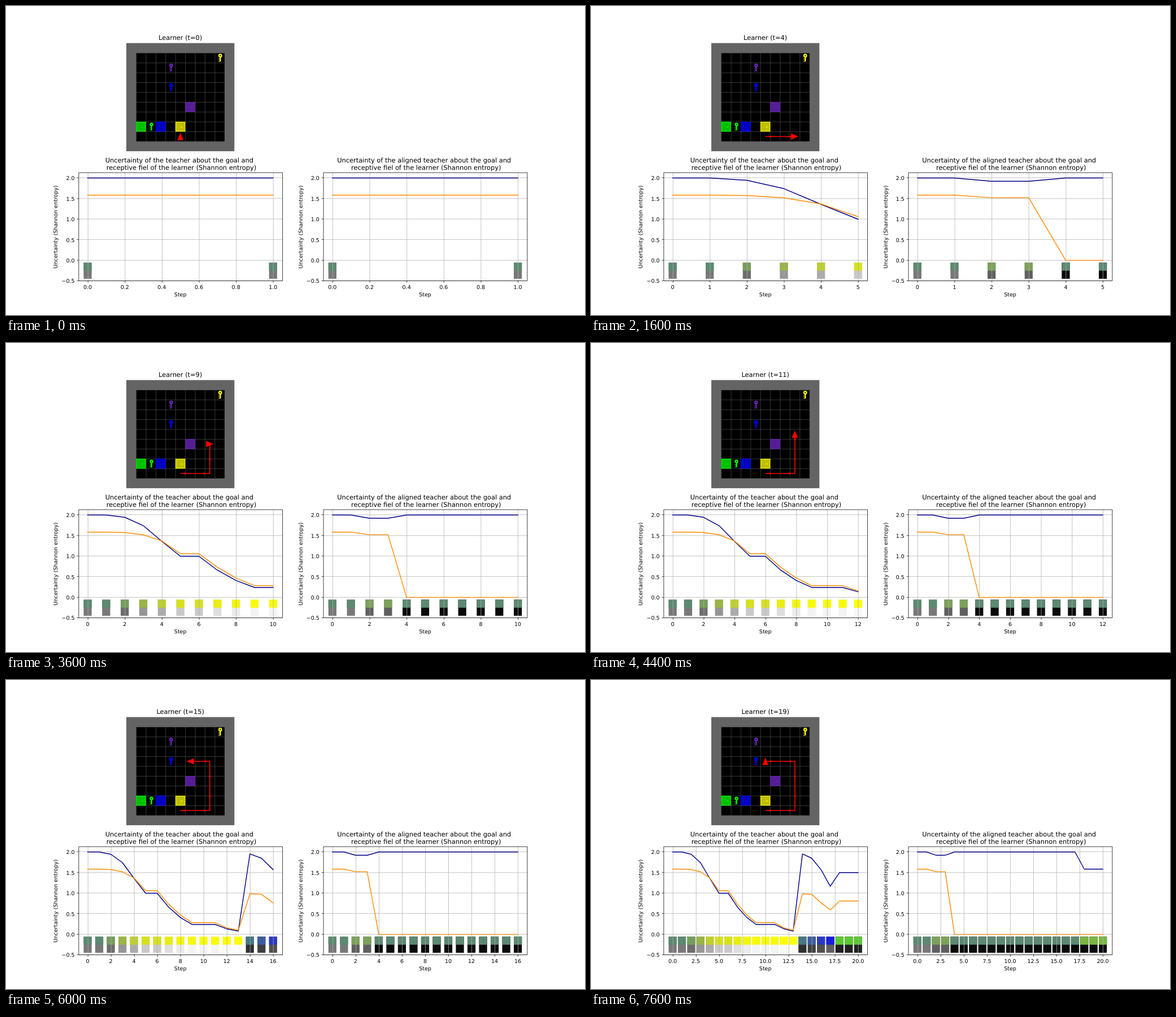
An HTML page for the animation above (8 s loop, 1025 px wide and 547 px high).

```html
<!DOCTYPE html>
<html lang="en">
<head>
<meta charset="utf-8">
<title>Learner and teacher uncertainty</title>
<style>
  html, body { margin: 0; width: 100%; height: 100%; overflow: hidden; background: #fff; }
  svg { display: block; width: 1025px; height: 547px; }
  text { font-family: "DejaVu Sans", Verdana, sans-serif; font-size: 13.89px; fill: #000; text-rendering: geometricPrecision; }
  text.title { font-size: 16.67px; }
</style>
</head>
<body>
<svg id="stage" viewBox="0 0 1500 800" preserveAspectRatio="none"></svg>
<script>
// The figure is laid out as 15 x 8 inches at 100 dpi.
const STEP_MS = 400, STEPS = 20, HEIGHT = 800;
const stage = document.getElementById('stage');

const pt = v => v * 100 / 72;
const snapX = x => Math.floor(x + 0.5) + 0.5;
const snapY = y => HEIGHT - snapX(HEIGHT - y);
const text = (x, y, s, anchor = 'middle', extra = '') =>
  `<text x="${x}" y="${y}" text-anchor="${anchor}" ${extra}>${s}</text>`;
const title = (x, y, s) => text(x, y, s, 'middle', 'class="title"');
const rect = (x, y, w, h, fill) =>
  `<rect x="${x}" y="${y}" width="${w}" height="${h}" fill="${fill}"/>`;
const path = (d, stroke, width) =>
  `<path d="${d}" fill="none" stroke="${stroke}" stroke-width="${width}"/>`;

// ---- Maze ----
const MAZE = { x: 311.7, y: 96, cell: 280 / 11, size: 11 };
const GOALS = { yellow: [255, 255, 0], green: [0, 255, 0], blue: [0, 0, 255], purple: [112, 39, 195] };
const GOAL_COLORS = Object.values(GOALS);
const rgb = (c, k = 1) => `rgb(${c.map(v => Math.round(v * k))})`;
const inCell = (col, row, body) =>
  `<g transform="translate(${MAZE.x + col * MAZE.cell} ${MAZE.y + row * MAZE.cell}) scale(${MAZE.cell})">${body}</g>`;

function door(col, row, c) {
  return inCell(col, row, rect(0, 0, 1, 1, rgb(c)) +
    rect(0.06, 0.06, 0.88, 0.88, rgb(c, 0.75)) + rect(0.52, 0.5, 0.23, 0.06, rgb(c)));
}

function key(col, row, c) {
  const fill = rgb(c);
  return inCell(col, row, rect(0.5, 0.31, 0.13, 0.57, fill) +
    rect(0.38, 0.59, 0.12, 0.07, fill) + rect(0.38, 0.81, 0.12, 0.07, fill) +
    `<circle cx=".56" cy=".28" r=".19" fill="${fill}"/><circle cx=".56" cy=".28" r=".064"/>`);
}

function mazeBackground() {
  const { x, y, cell, size } = MAZE, inner = cell * (size - 2);
  let lines = '';
  for (let i = 1; i < size - 1; i++) {
    const d = i * cell + 0.4;
    lines += `M${x + d} ${y + cell}v${inner}M${x + cell} ${y + d}h${inner}`;
  }
  const { yellow, green, blue, purple } = GOALS;
  return rect(x, y, cell * size, cell * size, '#646464') +
    rect(x + cell, y + cell, inner, inner, '#000') + path(lines, '#646464', 0.8) +
    door(1, 8, green) + door(3, 8, blue) + door(5, 8, yellow) + door(6, 6, purple) +
    key(9, 1, yellow) + key(4, 2, purple) + key(4, 4, blue) + key(2, 8, green);
}

// F moves forward, L and R turn.
const ACTIONS = 'RFFFLFFFRLFFLFFFLLL';
const HEADINGS = [[1, 0], [0, 1], [-1, 0], [0, -1]];

function agent(t) {
  const { x, y, cell } = MAZE;
  const center = (c, r) => [x + (c + 0.5) * cell, y + (r + 0.5) * cell];
  let col = 5, row = 9, dir = 3, moves = 0, marks = '';
  let trail = 'M' + center(col, row);
  for (const action of ACTIONS.slice(0, t)) {
    if (action !== 'F') { dir = (dir + (action === 'R' ? 1 : 3)) % 4; continue; }
    const [dx, dy] = HEADINGS[dir];
    if (moves++ % 2 === 0) {
      const [mx, my] = center(col + dx / 2, row + dy / 2);
      marks += `<path transform="translate(${mx} ${my}) rotate(${dir * 90})" d="M-3-3L3.5 0L-3 3z" fill="red"/>`;
    }
    col += dx; row += dy;
    trail += 'L' + center(col, row);
  }
  return path(trail, 'red', 2.3) + marks + inCell(col, row,
    `<path transform="rotate(${dir * 90} .5 .5)" d="M.12 .19L.87 .5L.12 .81z" fill="red"/>`);
}

// ---- Beliefs: goal weights [yellow, green, blue, purple], field entropy, field grey ----
const favourYellow = p => [p, (1 - p) / 3, (1 - p) / 3, (1 - p) / 3];
const even = favourYellow(0.25);
const belief = (weights, field, grey) => ({ weights, field, grey });
const repeat = (n, b) => Array(n).fill(b);
const unknown = belief(even, Math.log2(3), 120);

const TEACHER = [
  ...repeat(2, unknown),
  belief(favourYellow(0.375), 1.575, 109),
  belief(favourYellow(0.53), 1.52, 150),
  belief(favourYellow(0.698), 1.37, 171),
  ...repeat(2, belief(favourYellow(0.811), 1.06, 201)),
  belief(favourYellow(0.893), 0.73, 222),
  belief(favourYellow(0.942), 0.47, 235),
  ...repeat(3, belief(favourYellow(0.97), 0.285, 243)),
  belief(favourYellow(0.985), 0.16, 248),
  belief(favourYellow(0.992), 0.1, 250),
  belief([0.18, 0.26, 0.35, 0.21], 0.985, 48),
  belief([0.135, 0.195, 0.45, 0.22], 0.973, 63),
  belief([0.058, 0.122, 0.568, 0.252], 0.767, 80),
  belief([0.015, 0.075, 0.72, 0.19], 0.595, 94),
  ...repeat(3, belief([0.25, 0.5, 0, 0.25], 0.811, 32)),
];
const ALIGNED = [
  ...repeat(2, unknown),
  ...repeat(2, belief(favourYellow(0.4), 1.522, 95)),
  ...repeat(14, belief(even, 0, 10)),
  ...repeat(3, belief([1 / 3, 1 / 3, 0, 1 / 3], 0, 10)),
];

const entropy = ws => ws.reduce((h, w) => w ? h - w * Math.log2(w) : h, 0);
const blend = ws => rgb([0, 1, 2].map(i => ws.reduce((sum, w, g) => sum + w * GOAL_COLORS[g][i], 0)));

// ---- Charts ----
const TOP = 432, BOTTOM = 712, WIDTH = 528.41, SWATCH = pt(15);
const HAIR = pt(0.8), TICK = pt(3.5), HALF_SPACE = 2.65;
const yOf = v => BOTTOM - (v + 0.5) * (BOTTOM - TOP) / 2.625;

function tickStep(last) {
  const raw = last * 1.1 / 9;
  return [0.2, 0.25, 0.5, 1, 2, 2.5].find(s => s >= raw);
}

function chart(left, who, beliefs, last) {
  const right = left + WIDTH, mid = left + WIDTH / 2, pad = WIDTH / 22;
  const [x0, x1, y0, y1] = [snapX(left), snapX(right), snapY(TOP), snapY(BOTTOM)];
  const xOf = i => left + pad + i / last * (WIDTH - 2 * pad);
  let swatches = '', grid = '', ticks = '', labels = '';

  for (let i = 0; i <= last; i++) {
    const x = xOf(i) - SWATCH / 2, y = yOf(-0.25), b = beliefs[i];
    swatches += rect(x, y - SWATCH, SWATCH, SWATCH * 2, rgb([b.grey, b.grey, b.grey])) +
      rect(x, y - SWATCH, SWATCH, SWATCH, blend(b.weights));
  }

  const step = tickStep(last);
  const digits = step === 0.25 ? 2 : step % 1 ? 1 : 0;
  for (let n = 0; n * step <= last * 23 / 22 + 1e-9; n++) {
    const x = xOf(n * step);
    grid += `M${snapX(x)} ${y0}V${y1}`;
    ticks += `M${snapX(x)} ${y1}v${TICK}`;
    labels += text(x, 732.5, (n * step).toFixed(digits));
  }
  for (let v = -0.5; v <= 2; v += 0.5) {
    const y = yOf(v);
    grid += `M${x0} ${snapY(y)}H${x1}`;
    ticks += `M${x0} ${snapY(y)}h${-TICK}`;
    labels += text(left - 2 * TICK, y + 5.3, v.toFixed(1).replace('-', '\u2212'), 'end');
  }

  const curve = (value, color) =>
    `<polyline points="${beliefs.slice(0, last + 1).map((b, i) => [xOf(i), yOf(value(b))]).join(' ')}"
      fill="none" stroke="${color}" stroke-width="${pt(1.5)}" stroke-linejoin="round" stroke-linecap="square"/>`;

  return swatches + path(grid, '#b0b0b0', HAIR) +
    curve(b => entropy(b.weights), '#00008b') + curve(b => b.field, '#ff8c00') +
    path(`M${x0} ${y0}H${x1}V${y1}H${x0}z` + ticks, '#000', HAIR) + labels +
    text(mid, 752, 'Step') +
    text(0, 0, 'Uncertainty (Shannon entropy)', 'middle',
      `transform="translate(${left - 54} ${(TOP + BOTTOM) / 2}) rotate(-90)"`) +
    title(mid - HALF_SPACE, 405, `Uncertainty of the ${who} about the goal and`) +
    title(mid + HALF_SPACE, 423.7, 'receptive fiel of the learner (Shannon entropy)');
}

const background = mazeBackground();
let shown = -1;

function draw() {
  const t = Math.floor(performance.now() / STEP_MS) % STEPS;
  if (t !== shown) {
    shown = t;
    stage.innerHTML = title(451.7, 87.7, `Learner (t=${t})`) + background + agent(t) +
      chart(187.5, 'teacher', TEACHER, t + 1) +
      chart(821.6, 'aligned teacher', ALIGNED, t + 1);
  }
  requestAnimationFrame(draw);
}
draw();
</script>
</body>
</html>
```
